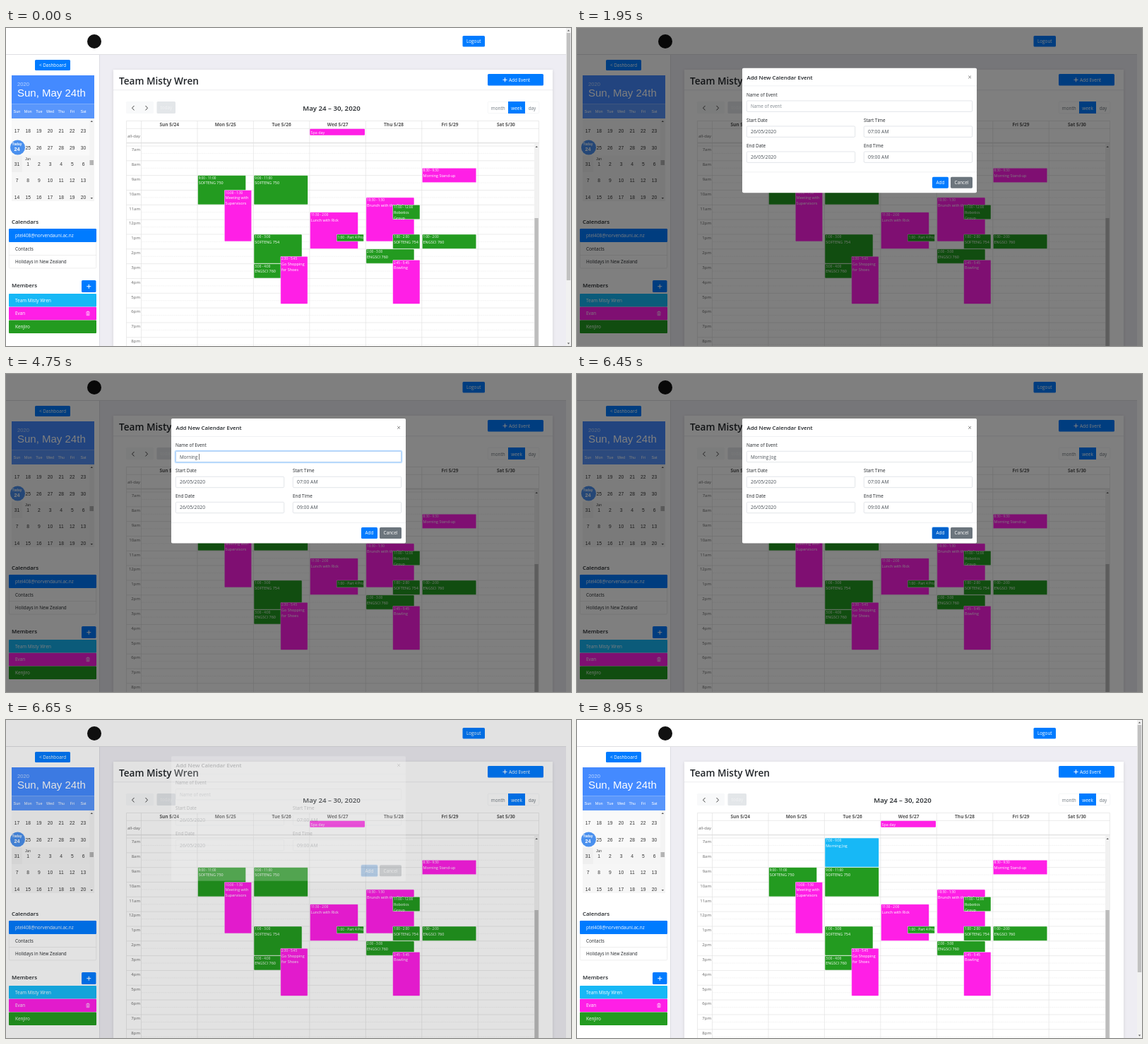
Recreate the animation shown at these times as an HTML page. Size 800 by 450 pixels, loop 9 s.

```html
<!DOCTYPE html>
<html lang="en">
<head>
<meta charset="utf-8">
<title>Team calendar</title>
<style>
  html, body { margin: 0; width: 100%; height: 100%; overflow: hidden; background: #fff; }
  svg { display: block; }
  text { white-space: pre; font-family: "Open Sans", "Noto Sans", sans-serif; }
  .arial { font-family: "Liberation Sans", Arial, sans-serif; }
</style>
</head>
<body>
<svg id="stage" width="100%" height="100%" viewBox="0 0 800 450"></svg>
<script>
const LOOP = 9000;
const BLUE = '#007bff', CYAN = '#17b8f6', PINK = '#ff1fe6', GREEN = '#239b20';
const INK = '#212529', GRAY = '#495057', LINE = '#dddddd';
const TEAM = 'Team Misty Wren';

// ---- Drawing helpers, all returning SVG markup ----
const rect = (x, y, w, h, fill, extra = '') =>
  `<rect x="${x}" y="${y}" width="${w}" height="${h}" fill="${fill}" ${extra}/>`;
const text = (x, y, str, size, fill = INK, extra = '') =>
  `<text x="${x}" y="${y}" font-size="${size}" fill="${fill}" ${extra}>${str}</text>`;
const path = (d, stroke, width = 1, extra = '') =>
  `<path d="${d}" fill="none" stroke="${stroke}" stroke-width="${width}" ${extra}/>`;
const shape = (d, fill) => `<path d="${d}" fill="${fill}"/>`;
const group = (id, body, extra = '') => `<g id="${id}" ${extra}>${body}</g>`;
const MID = 'text-anchor="middle"', END = 'text-anchor="end"';
const SEMI = 'font-weight="600"', BOLD = 'font-weight="700"';
const button = (x, y, w, h, label, fill = BLUE, extra = '') =>
  rect(x, y, w, h, fill, 'rx="1.6" ' + extra) +
  text(x + w / 2, y + h / 2 + 2.3, label, 6.4, '#fff', MID);
const plus = (x, y, r) => path(`M${x - r} ${y}h${2 * r}M${x} ${y - r}v${2 * r}`, '#fff', 1);
const upArrow = (x, y) => shape(`M${x - 1.7} ${y + 1}h3.4l-1.7 -2z`, '#555');
const downArrow = (x, y) => shape(`M${x - 1.7} ${y - 1}h3.4l-1.7 2z`, '#555');

// ---- Page frame ----
function pageFrame() {
  return rect(0, 0, 800, 450, '#fff') +
    rect(132, 38, 661, 412, '#eeedf3') +
    rect(0, 37, 793, 1, '#dfdfe3') + rect(132, 38, 1, 412, '#dcdce2') +
    '<circle cx="125" cy="19" r="10" fill="#111"/>' +
    button(646.5, 11, 31.5, 15.5, 'Logout') +
    rect(152, 59, 622, 400, '#fff', 'filter="url(#shadow)"') +
    rect(152, 87.5, 622, .7, '#e4e4e8') +
    text(160, 79.5, TEAM, 13.6, INK, SEMI) +
    rect(682, 65, 79, 16.5, BLUE, 'rx="1.6"') + plus(706.5, 73.3, 3) +
    text(712, 75.6, 'Add Event', 6.4, '#fff');
}

// ---- Sidebar ----
function miniCalendar() {
  const colX = i => 15.5 + i * 15.67;
  const weeks = [[17, 145.5], [24, 169], [31, 192], [7, 215.5], [14, 239]];
  let out = rect(8, 67, 117, 40.5, '#448aff') + rect(8, 107.5, 117, 20.5, '#5996fb') +
    text(16, 81.5, '2020', 7.6, '#b9d4ff', 'class="arial"') +
    text(16, 96.5, 'Sun, May 24th', 15, '#fff', 'class="arial"') +
    rect(8, 128, 117, 117, '#f9f9f9') + rect(8, 180.5, 15.5, 23.5, '#efefef') +
    rect(23.5, 180.5, 94.5, 23.5, '#f5f5f5') + rect(8, 204, 110, 41, '#f6f6f6');
  ['Sun', 'Mon', 'Tue', 'Wed', 'Thu', 'Fri', 'Sat'].forEach((day, i) =>
    out += text(colX(i), 120, day, 5.5, '#fff', MID + ' class="arial"'));
  weeks.forEach(([first, y], w) => {
    for (let i = 0; i < 7; i++) {
      const day = w === 2 && i ? i : first + i;
      if (day !== 24) out += text(colX(i), y + 2.5, day, 6.7, '#333', MID + ' class="arial"');
    }
  });
  return out +
    text(31, 187, 'Jun', 4.8, '#333', MID + ' class="arial"') +
    '<circle cx="16.5" cy="169" r="10.5" fill="#4a90ee"/>' +
    text(15.5, 166.3, 'Today', 4.8, '#fff', MID + BOLD.padStart(18) + ' class="arial"') +
    text(15.5, 174, '24', 7.2, '#fff', MID + ' ' + BOLD + ' class="arial"') +
    rect(118, 128, 7, 117, '#f4f4f4') + rect(118.5, 187, 5.5, 7, '#b4b4b4') +
    upArrow(121.3, 132) + downArrow(121.3, 241);
}

function sidebar() {
  let out = button(41, 45, 50, 15, '&lt; Dashboard') + miniCalendar() +
    text(8, 276.5, 'Calendars', 7.9, INK, SEMI) + text(8, 367, 'Members', 7.9, INK, SEMI) +
    rect(4.3, 284.3, 123.4, 55.6, '#fff', `rx="1.5" stroke="${LINE}" stroke-width=".5"`) +
    rect(4, 284, 124, 19, BLUE, 'rx="1.2"') + rect(4, 321.3, 124, .5, LINE) +
    button(107, 357, 20.5, 17, '') + plus(117.3, 365.7, 3);
  ['ptel408@norvendauni.ac.nz', 'Contacts', 'Holidays in New Zealand'].forEach((name, i) =>
    out += text(13, 295.8 + i * 18.7, name, 6.37, i ? INK : '#fff'));
  [[TEAM, CYAN], ['Evan', PINK], ['Kenjiro', GREEN]].forEach(([name, color], i) =>
    out += rect(4, 376 + i * 18.8, 124, 18.4, color, 'rx="1"') +
      text(13, 387.6 + i * 18.8, name, 6.37, '#fff'));
  return out + path('M113.5 402h5M115 402v-.9h2v.9M114 402.5l.2 4.2h3.6l.2 -4.2M115.5 403.5v2.3M116.6 403.5v2.3', '#fff', .6);
}

// ---- Week view ----
const HOUR = 20.83, COL = 79.45;
const timeY = t => 167 + (t - 7) * HOUR;
const colLeft = day => 191.5 + day * COL;
const clock = t => `${Math.floor((t - 1) % 12) + 1}:${String(Math.round(t % 1 * 60)).padStart(2, '0')}`;

// lane: f = full width, l = left part, r = right part
function eventBox(day, lane, start, end, color, lines, ink = '#fff') {
  const x = colLeft(day) + (lane === 'r' ? 38.4 : .6), y = timeY(start);
  const w = { f: 76.4, l: 68, r: 38.3 }[lane], h = (end - start) * HOUR;
  const short = h < 12;
  const label = short ? `${clock(start)} - ${lines[0]}` : `${clock(start)} - ${clock(end)}`;
  return `<svg x="${x - .4}" y="${y - .4}" width="${w + .8}" height="${h + .4}">` +
    rect(.3, .3, w + .2, h - .3, color, 'rx="1.2" stroke="#fff" stroke-width=".6"') +
    text(1.6, short ? 6.2 : 5.5, label, short ? 4.9 : 4.6, ink) +
    (short ? '' : lines.map((s, i) => text(1.6, 13.2 + i * 7.8, s, 5.45, ink)).join('')) +
    '</svg>';
}

const EVENTS = [
  [1, 'l', 9, 11, GREEN, ['SOFTENG 750']],
  [1, 'r', 10, 13.5, PINK, ['Meeting with', 'Supervisors']],
  [2, 'f', 9, 11, GREEN, ['SOFTENG 750']],
  [2, 'l', 13, 15, GREEN, ['SOFTENG 754']],
  [2, 'l', 15, 16, GREEN, ['ENGSCI 760']],
  [2, 'r', 14.5, 17.75, PINK, ['Go Shopping', 'for Shoes']],
  [3, 'l', 11.5, 14, PINK, ['Lunch with Rick']],
  [3, 'r', 13, 13.5, GREEN, ['Part 4 Project']],
  [4, 'l', 10.5, 13.5, PINK, ['Brunch with the Girls']],
  [4, 'r', 11, 12, GREEN, ['Robotics', 'Group']],
  [4, 'r', 13, 14, GREEN, ['SOFTENG 754']],
  [4, 'l', 14, 15, GREEN, ['ENGSCI 760']],
  [4, 'r', 14.75, 17.75, PINK, ['Bowling']],
  [5, 'f', 8.5, 9.5, PINK, ['Morning Stand-up']],
  [5, 'f', 13, 14, GREEN, ['ENGSCI 760']]
];

function toolbar() {
  return rect(170, 104, 39, 17, '#f8f9fa', 'rx="1.6"') +
    path('M181.5 110l-3 3.2l3 3.2M197.5 110l3 3.2l-3 3.2', '#444', 1) +
    rect(213.5, 104, 26.5, 17, '#e3e6e9', 'rx="1.6"') +
    text(226.8, 115.3, 'today', 6.4, '#f1f3f4', MID) +
    text(461, 117, 'May 24 – 30, 2020', 9.7, INK, MID + ' ' + SEMI) +
    rect(682.3, 104.3, 72.4, 16.4, '#fff', 'rx="1.6" stroke="#eef0f2" stroke-width=".6"') +
    rect(711, 104, 24, 17, BLUE) +
    text(696.7, 115.5, 'month', 6.4, '#6c757d', MID) +
    text(723, 115.5, 'week', 6.4, '#fff', MID) +
    text(745, 115.5, 'day', 6.4, '#6c757d', MID);
}

function weekGrid() {
  let out = toolbar() + path('M170.5 450V131.5H754.5V450M170.5 142.3H754.5', LINE, .6) +
    rect(170.5, 161.8, 584, 1.6, '#e4e4e4') + text(190, 154.5, 'all-day', 5.9, '#666', END);
  ['Sun', 'Mon', 'Tue', 'Wed', 'Thu', 'Fri', 'Sat'].forEach((name, i) => {
    out += text(colLeft(i) + COL / 2, 139, `${name} 5/${24 + i}`, 6.5, '#555', MID + ' ' + BOLD) +
      path(`M${colLeft(i)} 131.5V450`, LINE, .6);
  });
  for (let h = 7; h <= 20; h++) {
    const y = timeY(h);
    out += path(`M170.5 ${y}H748`, LINE, .6) +
      path(`M191.5 ${y + HOUR / 2}H748`, '#e3e3e3', .5, 'stroke-dasharray="1 .6"') +
      text(190, y + 7.3, (h - 1) % 12 + 1 + (h < 12 ? 'am' : 'pm'), 6, '#666', END);
  }
  return out + rect(748, 163.5, 6.3, 287, '#f1f1f1') + rect(748.4, 269, 5.4, 181, '#bcbcbc') +
    upArrow(751.2, 168) +
    rect(430.3, 142.8, 77.7, 9, PINK, 'rx="1"') + text(431.5, 149.5, 'Spa day', 5.45, '#fff') +
    EVENTS.map(e => eventBox(...e)).join('');
}

const pageScrollbar = () => rect(793, 0, 7, 450, '#f1f1f1') +
  rect(793.8, 7, 5.4, 350, '#c1c1c1') + upArrow(796.5, 3.5) + downArrow(796.5, 446.5);

// ---- Dialog ----
const field = (x, y, w, label, value, size = 6.8) =>
  text(x, y - 6, label, 6.4) +
  rect(x + .3, y + .3, w - .6, 15.4, '#fff', 'rx="1.5" stroke="#ced4da" stroke-width=".6"') +
  text(x + 6, y + 10.4, value, size, GRAY);

function dialog() {
  return rect(234, 63, 332, 176.5, '#fff', 'rx="1.8"') +
    text(240.5, 79, 'Add New Calendar Event', 7.85, INK, SEMI) +
    path('M554.2 73.9l3.8 3.8M558 73.9l-3.8 3.8', '#777', .9) +
    rect(234, 88, 332, .5, '#dee2e6') + rect(234, 210, 332, .5, '#dee2e6') +
    field(240, 109, 320, 'Name of Event', '') +
    group('focus', rect(239.3, 108.3, 321.4, 17.4, 'none', 'rx="2" stroke="#bfdeff" stroke-width="1.3"') +
      rect(240.3, 109.3, 319.4, 15.4, 'none', 'rx="1.5" stroke="#80bdff" stroke-width=".6"')) +
    text(246, 119.5, '', 6.4, GRAY, 'id="name"') +
    rect(0, 113, .6, 8.4, '#222', 'id="caret"') +
    field(240, 145, 154, 'Start Date', '26/05/2020') +
    field(406, 145, 154, 'Start Time', '07:00 AM') +
    field(240, 181, 154, 'End Date', '26/05/2020') +
    field(406, 181, 154, 'End Time', '09:00 AM') +
    group('dateTools', path('M368.2 151.6l3.4 3.4M371.6 151.6l-3.4 3.4', '#2a4a8a', 1) +
      upArrow(376.4, 150.8) + downArrow(376.4, 155.6) + shape('M381.3 151.4h5l-2.5 4z', '#333')) +
    rect(502.3, 216.3, 24.4, 17.4, '#8fc3ff', 'id="addRing" rx="2"') +
    button(503, 217, 23, 16, 'Add', BLUE, 'id="add"') +
    button(529, 217, 31, 16, 'Cancel', '#6c757d');
}

document.getElementById('stage').innerHTML =
  '<defs><filter id="shadow" x="-5%" y="-5%" width="110%" height="110%">' +
  '<feDropShadow dx="0" dy="1" stdDeviation="2" flood-color="#000" flood-opacity=".12"/></filter></defs>' +
  pageFrame() + sidebar() + weekGrid() +
  group('selection', '') +
  group('newEvent', eventBox(2, 'f', 7, 9, CYAN, ['Morning Jog'])) +
  group('scrollbar', pageScrollbar()) +
  rect(0, 0, 800, 450, '#000', 'id="backdrop"') + group('modal', dialog());

// ---- Motion ----
const el = Object.fromEntries([...document.querySelectorAll('[id]')].map(e => [e.id, e]));
const OPEN = 1800, CLOSE = 6535, FOCUS = 2650, BLUR = 6400;
const NAME = 'Morning Jog';
const KEYS = [3750, 3880, 4010, 4140, 4270, 4400, 4530, 4680, 4900, 5050, 5200];
const clamp = v => Math.max(0, Math.min(1, v));
const easeOut = v => 1 - (1 - clamp(v)) ** 1.7;
const show = (node, on) => node.setAttribute('visibility', on ? 'inherit' : 'hidden');
const within = (t, a, b) => t >= a && t < b;

let shownEnd = null;
function drawSelection(t) {
  const end = t < 1300 ? 7.5 : t < 1430 ? 8 : t < 1560 ? 8.5 : 9;
  show(el.selection, within(t, 1100, 2300));
  if (end === shownEnd) return;
  shownEnd = end;
  el.selection.innerHTML = eventBox(2, 'f', 7, end, '#3484da', [''], '#1c3a5e');
}

function drawDialog(t) {
  const fade = clamp((t - OPEN) / 150) * (1 - clamp((t - CLOSE) / 150));
  const drop = t < CLOSE ? easeOut((t - OPEN) / 300) : 1 - easeOut((t - CLOSE) / 300);
  show(el.modal, fade > 0);
  el.modal.setAttribute('opacity', fade);
  el.modal.setAttribute('transform', `translate(0 ${-20.8 * (1 - drop)})`);
  el.backdrop.setAttribute('opacity', fade / 2);

  const typed = t < CLOSE ? KEYS.filter(k => k <= t).length : 0;
  el.name.textContent = typed ? NAME.slice(0, typed) : 'Name of event';
  el.name.setAttribute('fill', typed ? GRAY : '#7f868d');
  el.focus.setAttribute('opacity', clamp((t - FOCUS) / 150) * (1 - clamp((t - BLUR) / 50)));

  const lastKey = typed ? KEYS[typed - 1] : FOCUS;
  show(el.caret, within(t, FOCUS, BLUR) && (t - lastKey) % 1060 < 530);
  el.caret.setAttribute('x', 246.3 + (typed ? el.name.getComputedTextLength() : 0));

  show(el.dateTools, within(t, 2250, 2450) || within(t, 5600, 5750));
  el.add.setAttribute('fill', t >= 6150 ? '#0062cc' : BLUE);
  show(el.addRing, t >= BLUR);
}

function draw(t) {
  drawSelection(t);
  drawDialog(t);
  show(el.newEvent, t >= 7000);
  show(el.scrollbar, !within(t, OPEN, CLOSE + 300));
}

const begin = performance.now();
function tick() {
  draw((performance.now() - begin) % LOOP);
  requestAnimationFrame(tick);
}
tick();
</script>
</body>
</html>
```
